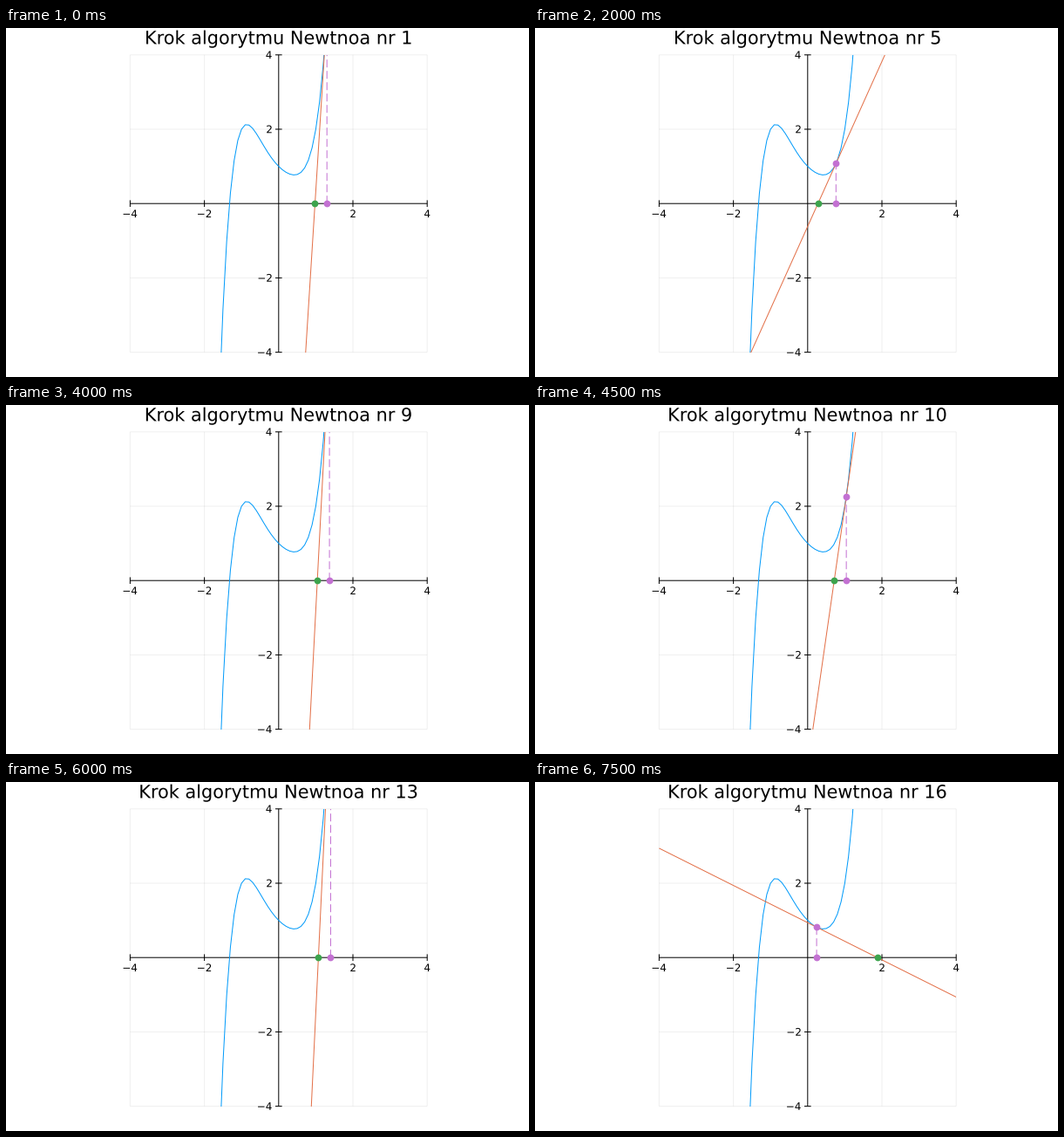
A matplotlib script that plays this animation: 600 px wide and 400 px high, repeating every 8000 ms.

```python
import numpy as np
import matplotlib.pyplot as plt
from matplotlib.animation import FuncAnimation
from matplotlib.patches import PathPatch
from matplotlib.textpath import TextPath
from matplotlib.transforms import Affine2D

W, H, DPI = 600, 400, 100
PX = 72 / DPI                    # one pixel in points
CX, CY, UNIT = 312.8, 201.2, 42.6  # plot origin and scale in pixels
LIM, STEPS = 4, 16
TITLE_SIZE, TICK_SIZE = 20.83, 11.9
BLUE, ORANGE, GREEN, PURPLE = "#009afa", "#e36f47", "#3da44d", "#c371d2"

plt.rcParams["path.snap"] = False
plt.rcParams["font.family"] = "DejaVu Sans"


def f(x):
    return x**5 + x**2 - x + 1


def df(x):
    return 5 * x**4 + 2 * x - 1


def newton(x, n):
    xs = [x]
    for _ in range(n):
        xs.append(xs[-1] - f(xs[-1]) / df(xs[-1]))
    return xs


def text_path(s, size, x, base, align=0.5):
    """Outline of s; align 0.5 centres its ink on x, 1 ends it there."""
    path = TextPath((0, 0), s, size=size)
    box = path.get_extents()
    left = x - box.x0 - align * box.width
    return path.transformed(Affine2D().translate(left, H - base))


def add_text(*args, **kw):
    patch = PathPatch(text_path(*args, **kw), fc="black", lw=0)
    return page.add_patch(patch)


def stroke(xs, ys, color="black", **kw):
    kw = {"lw": PX, "solid_capstyle": "butt", **kw}
    return ax.plot(xs, ys, color=color, **kw)[0]


def dots(color):
    return ax.plot([], [], "o", color=color, ms=7.8 * PX, mew=0, zorder=6)[0]


fig = plt.figure(figsize=(W / DPI, H / DPI), dpi=DPI, facecolor="white")

# Pixel-space layer for text
page = fig.add_axes([0, 0, 1, 1])
page.set(xlim=(0, W), ylim=(0, H))
page.axis("off")

side = 2 * LIM * UNIT
ax = fig.add_axes([(CX - side / 2) / W, 1 - (CY + side / 2) / H,
                   side / W, side / H])
ax.axis("off")

span = [-LIM, LIM]
tick = 3.8 / UNIT
for v in range(-LIM, LIM + 1, 2):
    if v:
        stroke([v, v], span, alpha=0.06, clip_on=False, zorder=1)
        stroke(span, [v, v], alpha=0.06, clip_on=False, zorder=1)
        stroke([v, v], [-tick, tick], clip_on=False, zorder=2)
        stroke([-tick, tick], [v, v], clip_on=False, zorder=2)
        name = str(v).replace("-", "\u2212")
        add_text(name, TICK_SIZE, CX + v * UNIT, 217.1)
        add_text(name, TICK_SIZE, 304.7, CY - v * UNIT + 4.3, align=1)
stroke(span, [0, 0], clip_on=False, zorder=2)
stroke([0, 0], span, clip_on=False, zorder=2)

grid = np.linspace(-LIM, LIM, 81)
stroke(grid, f(grid), BLUE, zorder=3)
tangent = stroke([], [], ORANGE, zorder=4)
drop = stroke([], [], PURPLE, ls=(0, (9, 4)), zorder=5)
now, nxt = dots(PURPLE), dots(GREEN)
title = add_text("K", TITLE_SIZE, CX, 18.4)
ax.set(xlim=span, ylim=span)

xs = newton(1.3, STEPS)
ends = np.array(span)


def update(i):
    x, y = xs[i], f(xs[i])
    tangent.set_data(ends, y + df(x) * (ends - x))
    drop.set_data([x, x], [0, y])
    now.set_data([x, x], [0, y])
    nxt.set_data([xs[i + 1]], [0])
    title.set_path(text_path(f"Krok algorytmu Newtnoa nr {i + 1}",
                             TITLE_SIZE, CX, 18.4))
    return tangent, drop, now, nxt, title


anim = FuncAnimation(fig, update, frames=STEPS, interval=500,
                     repeat=True, repeat_delay=0, blit=False)
plt.show()
```
